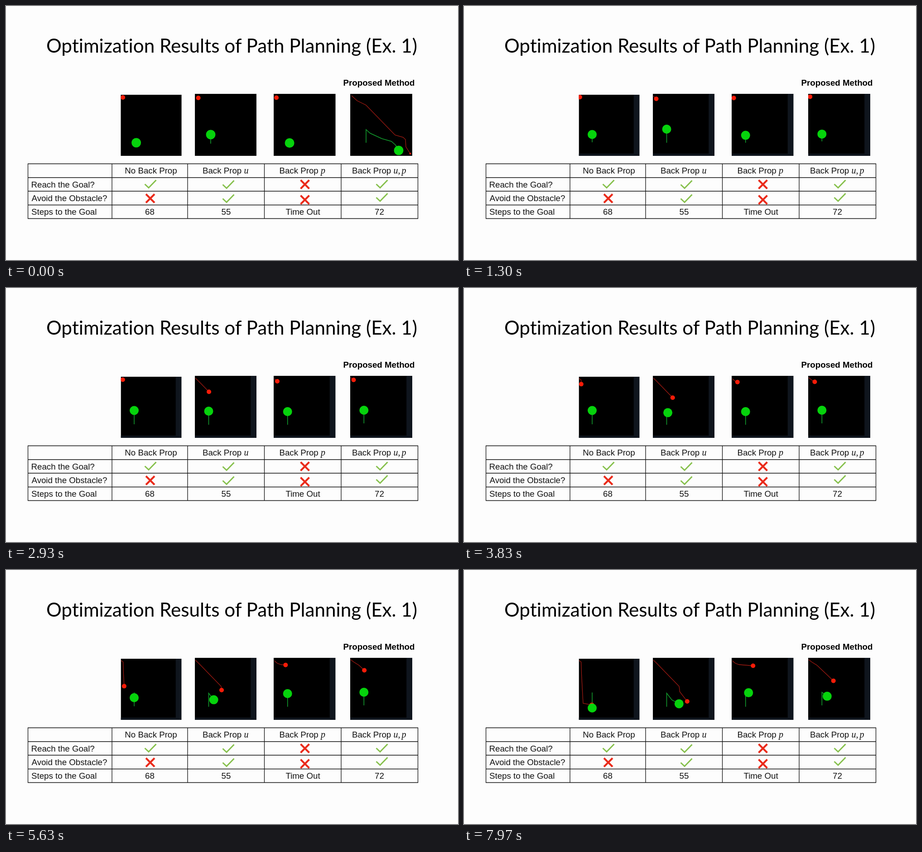
Recreate the animation shown at these times as an HTML page. Size 998x561 px, loop 8 s.

```html
<!DOCTYPE html>
<html lang="en">
<head>
<meta charset="utf-8">
<title>Path planning results</title>
<style>
  html, body { margin: 0; width: 100%; height: 100%; overflow: hidden; background: #fdfdfd; }
  svg { display: block; width: 998px; height: 561px; }
  text { font: 18.7px "Liberation Sans", Arial, sans-serif; fill: #111; }
  .title { font: 42.2px Lato, sans-serif; font-variant-ligatures: none; fill: #000; }
  .bold { font-weight: bold; fill: #000; }
  .math { font: italic 20px "Liberation Serif", serif; }
  .mid { text-anchor: middle; }
  .grid { fill: none; stroke: #111; stroke-width: 1.3; }
  .tick { fill: none; stroke: #86c04c; stroke-width: 3; }
  .cross { fill: none; stroke: #ea2a1a; stroke-width: 4; }
  .frame { fill: none; stroke: #262626; }
  .edge { fill: #0f151d; }
  .trail { fill: none; stroke-width: 1.3; }
  .agent.trail { stroke: #a01a12; }
  .obstacle.trail { stroke: #12982c; stroke-width: 1.6; }
  circle.agent { fill: #f91c08; }
  circle.obstacle { fill: #06d30c; }
</style>
</head>
<body>
<svg viewBox="0 0 998 561">
  <defs>
    <path id="tick" class="tick" d="M-12.5 .5L-4 8.5L12.5 -8.5"/>
    <path id="cross" class="cross" d="M-9.5 -9.5L9.5 9.5M9.5 -9.5L-9.5 9.5"/>
  </defs>
  <text class="title mid" x="498.5" y="103">Optimization Results of Path Planning (Ex. 1)</text>
  <text class="bold mid" x="823.5" y="176">Proposed Method</text>
  <path class="grid" d="M48.5 348.5H909.5V469.5H48.5ZM48.5 379H909.5M48.5 409H909.5M48.5 439.5H909.5M234 348.5V469.5M401 348.5V469.5M570.5 348.5V469.5M740 348.5V469.5"/>
  <text class="mid" x="320" y="370">No Back Prop</text>
  <text x="434" y="370">Back Prop <tspan class="math">u</tspan></text>
  <text x="603.5" y="370">Back Prop <tspan class="math">p</tspan></text>
  <text x="764" y="370">Back Prop <tspan class="math">u,<tspan dx="3">p</tspan></tspan></text>
  <text x="55.5" y="400.5">Reach the Goal?</text>
  <text x="56.5" y="431">Avoid the Obstacle?</text>
  <text x="56" y="461">Steps to the Goal</text>
  <text class="mid" x="317.5" y="461">68</text>
  <text class="mid" x="486" y="461">55</text>
  <text class="mid" x="655.5" y="461">Time Out</text>
  <text class="mid" x="824.5" y="461">72</text>
  <use href="#tick" x="319" y="393"/>
  <use href="#tick" x="491" y="394"/>
  <use href="#tick" x="830" y="393"/>
  <use href="#tick" x="491" y="425"/>
  <use href="#tick" x="830" y="422.5"/>
  <use href="#cross" x="318.5" y="425"/>
  <use href="#cross" x="660" y="394"/>
  <use href="#cross" x="660" y="428"/>
  <g id="panels"></g>
</svg>
<script>
const LOOP = 8000, RESTART = 60, LEAD_START = -200;

// Each mover follows its lead until "rest", waits, then covers its run from "go" to the loop's end.
const panels = [
  {
    x: 253.5, y: 196, w: 134,
    agent: { lead: 'M254 200L258.5 203', rest: 3450, go: 3450, run: 'L259.5 231L263 294.5L283 298' },
    obstacle: { lead: 'M283 301V270.5', rest: 2450, go: 4450, run: 'V305' },
    still: { agent: 'M258 202h.1', obstacle: 'M287.5 302h.1' }
  },
  {
    x: 417, y: 194, w: 136,
    agent: { lead: 'M418 199L424.5 205', rest: 700, go: 1970, ease: .65, run: 'L475 257L476.5 269L493 290.5' },
    obstacle: { lead: 'M447.5 302V272', rest: 900, go: 3300, run: 'L459 287L475 295.5' },
    still: { agent: 'M424.5 203h.1', obstacle: 'M452 304V284' }
  },
  {
    x: 591, y: 194, w: 136.5,
    agent: { lead: 'M592.5 200.5L599 206', rest: 2930, go: 2930, ease: 1.2, run: 'L607.5 209L638.5 211.5' },
    obstacle: { lead: 'M621.7 302V273', rest: 2450, go: 7050, run: 'L628.5 271' },
    still: { agent: 'M597 202.5h.1', obstacle: 'M626 302.5h.1' }
  },
  {
    x: 760, y: 194, w: 137,
    agent: { lead: 'M761 198L767.5 203', rest: 2930, go: 2930, ease: 1.2, run: 'L779.5 210.5L816 245' },
    obstacle: { lead: 'M790.3 299V270', rest: 2500, go: 6000, run: 'L802 279' },
    still: {
      agent: 'M763 198L775 209L795 219L859 285L877 290L882 295L883 311L892.5 326',
      obstacle: 'M795 302V273L804 281L830 293L851 299L860 307L867 319',
      dot: 2
    }
  }
];

const kinds = ['agent', 'obstacle'];
const clamp = k => Math.min(1, Math.max(0, k));

function add(parent, name, attrs) {
  const node = document.createElementNS('http://www.w3.org/2000/svg', name);
  for (const key in attrs) node.setAttribute(key, attrs[key]);
  return parent.appendChild(node);
}

function addMovers(layer, paths, radii) {
  const trails = kinds.map(kind => add(layer, 'path', { class: kind + ' trail', d: paths[kind] }));
  return kinds.map((kind, i) => {
    const mover = { trail: trails[i], dot: add(layer, 'circle', { class: kind, r: radii[kind] }) };
    place(mover, mover.trail.getTotalLength());
    return mover;
  });
}

function place({ trail, dot }, distance) {
  const { x, y } = trail.getPointAtLength(distance);
  dot.setAttribute('cx', x);
  dot.setAttribute('cy', y);
  trail.setAttribute('stroke-dasharray', `${distance} 9999`);
}

function build(p, i) {
  const { x, y, w, still } = p, right = x + w, strip = right - 12.8;
  const box = { x, y, width: w, height: 331 - y };
  const root = document.getElementById('panels');
  add(add(root, 'clipPath', { id: 'clip' + i }), 'rect', box);
  const g = add(root, 'g', { 'clip-path': `url(#clip${i})` });
  add(g, 'rect', box);
  p.before = add(g, 'g');
  p.after = add(g, 'g');
  add(p.before, 'rect', { ...box, class: 'frame' });
  add(p.after, 'path', { class: 'edge', d: `M${strip} ${y}H${right}V331H${x}V326H${strip}Z` });
  addMovers(p.before, still, { agent: still.dot || 5, obstacle: 10.5 });

  const leads = { agent: p.agent.lead, obstacle: p.obstacle.lead };
  p.movers = addMovers(p.after, leads, { agent: 5, obstacle: 10 });
  p.movers.forEach((mover, k) => {
    const plan = p[kinds[k]], { trail } = mover;
    const leadLength = trail.getTotalLength();
    trail.setAttribute('d', plan.lead + plan.run);
    Object.assign(mover, plan, { leadLength, runLength: trail.getTotalLength() - leadLength });
  });
}

function travelled({ rest, go, ease = 1, leadLength, runLength }, t) {
  const lead = clamp((t - LEAD_START) / (rest - LEAD_START));
  const run = clamp((t - go) / (LOOP - go)) ** ease;
  return leadLength * lead + runLength * run;
}

function draw(p, t) {
  const restarted = t >= RESTART;
  p.before.style.display = restarted ? 'none' : '';
  p.after.style.display = restarted ? '' : 'none';
  for (const mover of p.movers) place(mover, travelled(mover, t));
}

panels.forEach(build);
const start = performance.now();
function frame() {
  const t = (performance.now() - start) % LOOP;
  panels.forEach(p => draw(p, t));
  requestAnimationFrame(frame);
}
frame();
</script>
</body>
</html>
```
